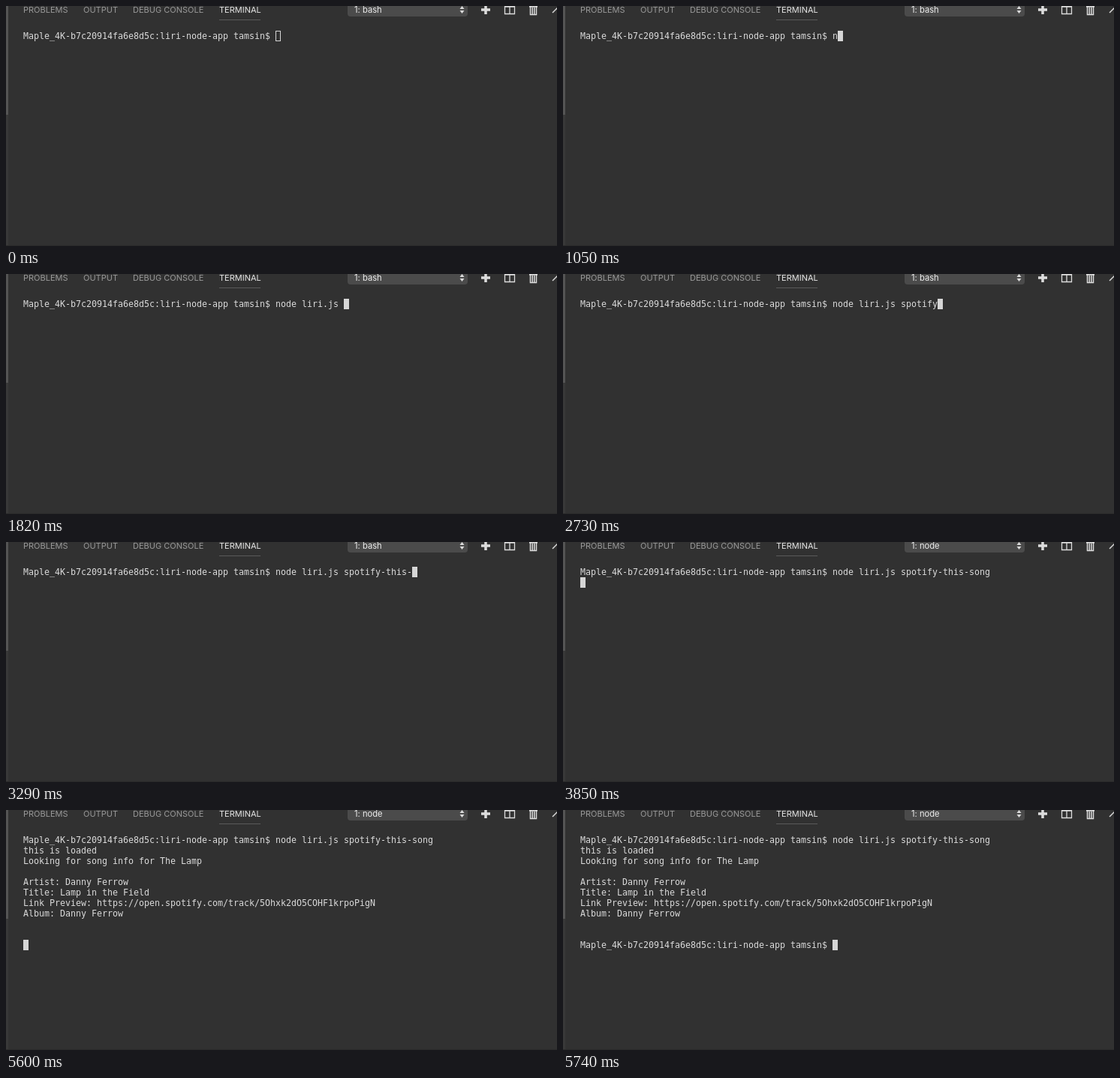
An HTML page for the animation above (6790 ms loop, 734 by 320 pixels).

```html
<!DOCTYPE html>
<html lang="en">
<head>
<meta charset="utf-8">
<title>Terminal</title>
<style>
  html, body { margin: 0; width: 100%; height: 100%; overflow: hidden; background: #313131; }
  svg, pre, #cursor { position: absolute; }
  svg { left: 0; top: 0; font: 11px Inter, sans-serif; }
  pre {
    left: 23px; top: 33px; margin: 0; color: #dadada;
    font: 11.63px/14px "DejaVu Sans Mono", monospace; font-variant-ligatures: none;
  }
  #cursor { width: 7px; height: 14px; box-sizing: border-box; border: 1px solid #d6d6d6; }
  #cursor.focus { background: #d6d6d6; }
</style>
</head>
<body>
<svg width="734" height="320" viewBox="0 0 734 320">
  <rect width="3" height="320" fill="#383838"/>
  <rect width="3" height="145" fill="#545454"/>
  <rect y="319" width="734" height="1" fill="#2b2b2b"/>
  <g fill="#999">
    <text x="23" y="9">PROBLEMS</text>
    <text x="103" y="9">OUTPUT</text>
    <text x="169" y="9">DEBUG CONSOLE</text>
    <text x="284" y="9" fill="#e6e6e6">TERMINAL</text>
  </g>
  <rect x="284" y="18" width="55" height="1" fill="#5a5a5a"/>
  <rect x="455" y="-10" width="160" height="24" rx="4" fill="#4b4b4b"/>
  <text id="shell" x="464" y="9" font-size="11.2" fill="#eee"></text>
  <path d="M604.5 4h6l-3-4zM604.5 6h6l-3 4z" fill="#dcdcdc"/>
  <g fill="none" stroke="#dcdcdc">
    <path d="M639-1v12M633 5h12" stroke-width="3.5"/>
    <path d="M664.5 0v10.5h13V0M671 0v10" stroke-width="1.3"/>
    <path d="M664 .5h14M697 .5h11" stroke-width="2.4"/>
    <path d="M698.5 1v10.5h8V1M701.2 2v9M703.8 2v9" stroke-width="1.5"/>
    <path d="M728 9l7-7" stroke-width="1.5"/>
  </g>
</svg>
<pre id="screen"></pre>
<div id="cursor"></div>
<script>
const LOOP = 6790, TICK = 70, FOCUS = 700, ENTER = 3780, LOADED = 4620, RESULT = 5600;
const prompt = "Maple_4K-b7c20914fa6e8d5c:liri-node-app tamsin$ ";
const loaded = "this is loaded\nLooking for song info for The Lamp\n";
const result = `
Artist: Danny Ferrow
Title: Lamp in the Field
Link Preview: https://open.spotify.com/track/5Ohxk2dO5COHF1krpoPigN
Album: Danny Ferrow


`;
// Bursts of typing by start time; "|" separates ticks.
const bursts = {
  1050: "n|o|d", 1330: "e| ", 1540: "li", 1680: "r|i|.js ",
  2170: "s|p|o", 2450: "t", 2590: "i|f|y|-",
  2940: "t|h|i|s", 3290: "-|s|o|n", 3640: "g"
};
const [shell, screen, cursor] = ["shell", "screen", "cursor"].map(id => document.getElementById(id));

const typedAt = t => Object.entries(bursts).map(([start, keys]) =>
  keys.split("|").filter((key, i) => t >= +start + i * TICK).join("")).join("");

function textAt(t) {
  let text = prompt + typedAt(t);
  if (t >= ENTER) text += "\n";
  if (t >= LOADED) text += loaded;
  if (t >= RESULT) text += result;
  if (t >= RESULT + TICK) text += prompt;
  return text;
}

function draw(now) {
  const t = now % LOOP, text = textAt(t), lines = text.split("\n");
  screen.textContent = text;
  shell.textContent = t < ENTER ? "1: bash" : "1: node";
  cursor.className = t < FOCUS ? "" : "focus";
  cursor.style.left = 23 + 7 * lines.at(-1).length + "px";
  cursor.style.top = 33 + 14 * (lines.length - 1) + "px";
  requestAnimationFrame(draw);
}
draw(performance.now());
</script>
</body>
</html>
```
